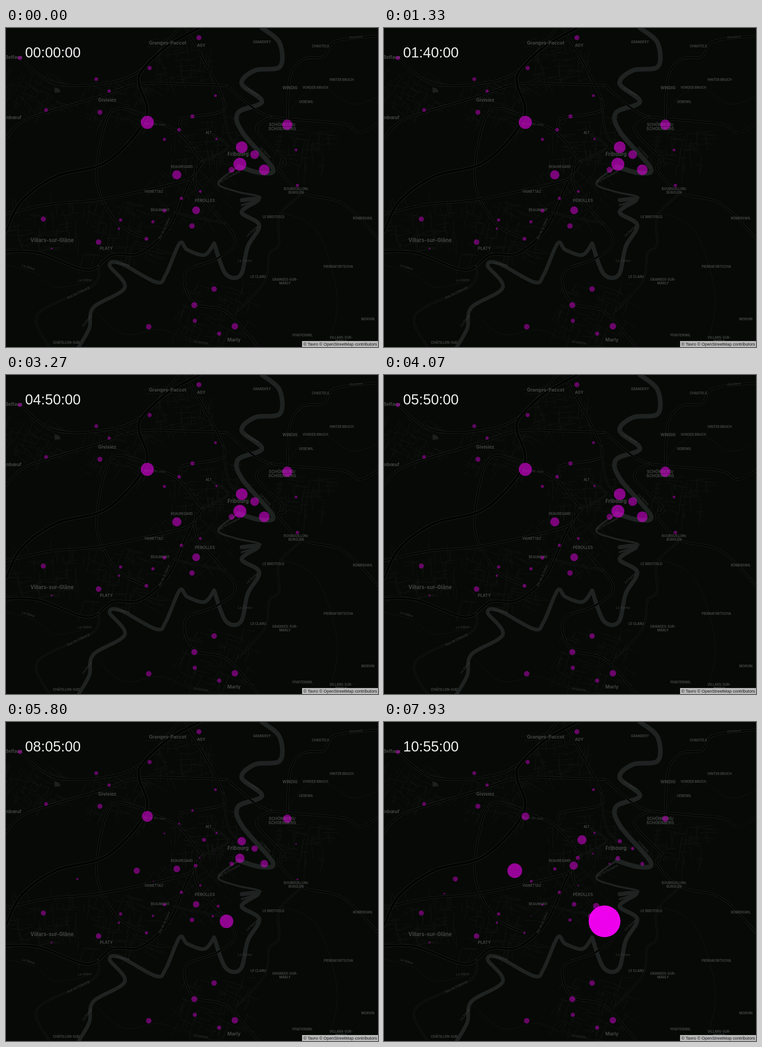
An HTML page for the animation above (8 s loop, 808x693 px).

```html
<!DOCTYPE html>
<html lang="en">
<head>
<meta charset="utf-8">
<title>Activity map</title>
<style>
  html, body { margin: 0; width: 100%; height: 100%; overflow: hidden; background: #060906; }
  svg { display: block; width: 808px; height: 693px; }
  path { fill: none; stroke-linejoin: round; stroke-linecap: round; }
  .street { stroke: #111411; stroke-width: 1; }
  .casing { stroke: #212421; }
  .core { stroke: #010201; }
  .river { stroke: #1e2221; }
  #labels { font-family: Inter, sans-serif; font-weight: 700; fill: #424543; text-anchor: middle; }
  #labels .line { font-weight: 400; font-style: italic; font-size: 7px; fill: #383b39; }
  #dots { fill: #f0f; }
  #clock { font: 31px "Liberation Sans", Arial, sans-serif; fill: #eee; }
  #credit { font: 9.25px "Liberation Sans", Arial, sans-serif; fill: #181818; text-anchor: end; }
</style>
</head>
<body>
<svg viewBox="0 0 808 693">
  <rect width="808" height="693" fill="#060906"/>
  <g id="map"></g>
  <g id="labels"></g>
  <g id="dots"></g>
  <text id="clock" x="41.6" y="64"></text>
  <rect x="643" y="680" width="165" height="13" fill="#b9b9b9"/>
  <text id="credit" x="806" y="689.5">© Tavro © OpenStreetMap contributors</text>
</svg>
<script>
const byId = id => document.getElementById(id);

function add(parent, tag, attributes, text = "") {
  const node = document.createElementNS("http://www.w3.org/2000/svg", tag);
  for (const key in attributes) node.setAttribute(key, attributes[key]);
  node.textContent = text;
  return byId(parent).appendChild(node);
}

const parse = points => points.split(" ").map(point => point.split(",").map(Number));

// Smooth curve through a few points
function curve(points) {
  const p = parse(points);
  let d = "M" + p[0];
  for (let i = 0; i < p.length - 1; i++) {
    const a = p[i - 1] || p[i], b = p[i], c = p[i + 1], e = p[i + 2] || c;
    const handle = (from, u, v) => from.map((n, k) => (n + (v[k] - u[k]) / 6).toFixed(1));
    d += `C${handle(b, a, c)} ${handle(c, e, b)} ${c}`;
  }
  return d;
}
const line = (cls, width, points) =>
  add("map", "path", { class: cls, "stroke-width": width, d: curve(points) });

// Faint street grid around a built-up area
let seed = 7;
const random = () => (seed = seed * 16807 % 2147483647) / 2147483647;
const spread = range => (random() * 2 - 1) * range;
function streets(x, y, radius) {
  const tilt = random() * Math.PI;
  let d = "";
  for (let i = 0; i < radius; i++) {
    const angle = tilt + (i % 2) * Math.PI / 2 + spread(0.25);
    const length = 12 + random() * 30;
    const dx = Math.cos(angle) * length, dy = Math.sin(angle) * length;
    d += `M${[x + spread(radius), y + spread(radius * 0.75), "l", dx, dy].join(" ")}`;
  }
  add("map", "path", { class: "street", d });
}
streets(430, 240, 75);
streets(400, 365, 75);
streets(250, 440, 85);
streets(90, 440, 75);
streets(240, 160, 70);
streets(55, 130, 60);
streets(390, 70, 65);
streets(640, 260, 60);
streets(450, 610, 80);

line("street", 1, "610,195 640,150 690,130 750,165 808,150");
line("street", 1, "590,400 650,420 690,470 720,590 700,693");
line("street", 1, "0,515 62,532 110,563 190,548");
line("street", 1, "190,612 255,665 335,655 405,682 480,693");

line("river", 10, "556,0 594,32 595,84 541,92 512,121 556,160 504,184 513,226 579,304 555,315 505,301");
line("river", 4, "505,301 461,337 500,355 553,368 512,385");
line("river", 9, "512,374 548,373 512,400 550,428 525,475 510,536 477,534 452,468");
line("river", 8, "452,468 431,493 394,482 377,468 347,536 326,552 250,512 225,516 258,564 190,607 181,652 158,693");

// Roads are thin grey edges around a black core
function road(width, points) {
  line("casing", width + 1.6, points);
  line("core", width, points);
}
road(3, "30,65 100,118 200,122 289,94 376,0");
road(3, "0,239 48,197 200,150 289,122 395,122 480,125");
road(3, "300,190 235,177 206,246 199,343 243,425 305,458");
road(3, "303,195 371,224 414,273 427,290");
road(3, "390,0 435,80 470,149 468,181 385,197 381,222");
road(3, "480,125 551,183 611,197 731,208 768,227 808,208");
road(3, "808,17 715,29 690,62 645,68 617,107 611,197");
road(4, "427,290 396,341 353,435 292,489 231,493 177,526 72,489 0,486");
road(3, "412,300 418,357 497,456 460,500 390,531 407,596 479,617 548,693");
road(3, "410,320 375,336 207,372 94,383 0,404");
road(3, "575,193 544,222 605,289 592,306 644,358 732,382 808,457");
road(2, "644,358 594,408 593,470 572,491 562,550 505,614");
road(2, "201,517 188,560 69,622 94,693");
road(2, "365,400 403,410 477,424");
road(2, "471,154 487,238 540,275");
road(2, "427,290 483,259 449,232");
road(5, "420,0 352,38 296,91 289,122 304,195 220,290 110,322 34,376 0,442");
add("map", "path", { d: "M105 129l10 3 4 7-13 2z", style: "fill:#1d201d" });

const place = (size, x, y, ...rows) => rows.forEach((text, i) =>
  add("labels", "text", { x, y: y + i * size * 1.1, "font-size": size }, text));
const LARGE = 11.2, MEDIUM = 10.2, DISTRICT = 8.6, SMALL = 7;
place(LARGE, 504, 278, "Fribourg");
place(LARGE, 100, 465, "Villars-sur-Glâne");
place(MEDIUM, 351, 36, "Granges-Paccot");
place(MEDIUM, 17, 67, "Belfaux");
place(MEDIUM, 17, 198, "nbœuf");
place(MEDIUM, 220, 160, "Givisiez");
place(MEDIUM, 495, 681, "Marly");
place(DISTRICT, 424, 41, "AGY");
place(DISTRICT, 617, 133, "WINDIG");
place(DISTRICT, 600, 213, "SCHÖNBERG/", "SCHOENBERG");
place(DISTRICT, 432, 378, "PÉROLLES");
place(DISTRICT, 218, 482, "PLATY");
place(SMALL, 440, 230, "ALT");
place(SMALL, 556, 33, "GRANDFEY");
place(SMALL, 683, 42, "CHASTELS");
place(SMALL, 729, 115, "HINTER BRUCH");
place(SMALL, 672, 132, "VORDER BRUCH");
place(SMALL, 652, 163, "UEBEWIL");
place(SMALL, 382, 304, "BEAUREGARD");
place(SMALL, 321, 358, "VIGNETTAZ");
place(SMALL, 335, 398, "BEAUMONT");
place(SMALL, 630, 352, "BOURGUILLON/", "BÜRGLEN");
place(SMALL, 581, 413, "LE BREITFELD");
place(SMALL, 775, 416, "RÖMERSWIL");
place(SMALL, 722, 521, "PIERRAFORTSCHA");
place(SMALL, 548, 543, "LE CLARU");
place(SMALL, 606, 549, "GRANGES-SUR-", "MARLY");
place(SMALL, 786, 635, "MORVIN");
place(SMALL, 644, 670, "PFAFFENWIL");
place(SMALL, 728, 675, "VILLARS-SUR-", "MARLY");
place(SMALL, 131, 686, "CHÂTILLON-SUD");

const along = (x, y, angle, text) =>
  add("labels", "text", { class: "line", transform: `translate(${x} ${y}) rotate(${angle})` }, text);
along(519, 508, 0, "La Sarine");
along(562, 272, 48, "La Sarine");
along(534, 140, 30, "La Sarine");
along(536, 443, -42, "La Sarine");
along(178, 637, -52, "La Sarine");
along(253, 515, 12, "La Sarine");
along(48, 522, 17, "La Glâne");
along(171, 550, -3, "La Glâne");
along(423, 685, 8, "La Gérine");
along(158, 577, -27, "Rue de Fribourg");
along(346, 437, -65, "Rte de la Glâne");
along(323, 211, 3, "Route du Jura");
along(486, 325, -28, "Sur-la-Fontaine");
along(760, 22, -4, "Stockera");

// Dots as x,y,radius; the shares scale the radius by night and by day
const dots = [];
function group(night, day, points) {
  for (const [cx, cy, size] of parse(points))
    dots.push({ night: size * night, day: size * day, node: add("dots", "circle", { cx, cy }) });
}
// Homes, steady all along
group(1, 1, "419,21,5.5 30,65,4.5 312,87,4.5 196,111,4 224,137,3.5 87,178,4 204,183,5.5");
group(1, 1, "455,147,3 457,241,2.5 381,370,3.5 81,415,5.5 249,417,3.5 245,436,2.5 201,465,6");
group(1, 1, "99,479,2 452,567,6 409,602,6.5 410,636,4.5 310,649,6 497,648,7 463,664,4.5");
// Quarters that empty in the morning
group(1, 0.6, "307,205,14.3 611,210,11 422,355,3 413,396,8.5 404,430,6 344,397,4 305,458,4");
group(1, 0.36, "512,259,12.7 540,275,9.5 508,296,14 490,308,6.5 561,308,11.5 371,319,10 319,421,3.5");
group(1, 0, "405,192,4.5 376,221,3.8 344,242,3.3 630,265,3 633,342,3.5");
// Workplaces that fill up
group(0, 1, "479,433,34.5 284,323,16 430,256,10 412,312,9 461,400,7 449,422,6");
group(0, 1, "155,341,5.5 421,295,4.5 320,346,3 454,286,2 131,373,2");

const LOOP = 8000, FRAMES = 120, DAWN = 72;

// The clock counts five-minute steps and skips quiet ones: frame,step
const clockKeys = parse("0,0 20,20 31,36 49,58 72,81 101,112 119,131");
function clockStep(frame) {
  const next = Math.max(1, clockKeys.findIndex(([key]) => key >= frame));
  const [[f0, s0], [f1, s1]] = clockKeys.slice(next - 1);
  return Math.round(s0 + (s1 - s0) * (frame - f0) / (f1 - f0));
}
const two = n => String(n).padStart(2, "0");

function draw(time) {
  const frame = Math.min(FRAMES - 1, Math.floor((time % LOOP + 4) * FRAMES / LOOP));
  const minutes = 5 * clockStep(frame);
  byId("clock").textContent = `${two(Math.floor(minutes / 60))}:${two(minutes % 60)}:00`;

  const morning = Math.max(0, (frame - DAWN) / (FRAMES - 1 - DAWN));
  const shift = 1 - (1 - morning) ** 1.45;
  for (const { node, night, day } of dots) {
    const r = night + (day - night) * shift;
    node.setAttribute("r", r.toFixed(2));
    node.setAttribute("opacity", Math.max(0.38, 0.275 + r * 0.019).toFixed(3));
  }
}

const start = performance.now();
function tick() {
  draw(performance.now() - start);
  requestAnimationFrame(tick);
}
tick();
</script>
</body>
</html>
```
